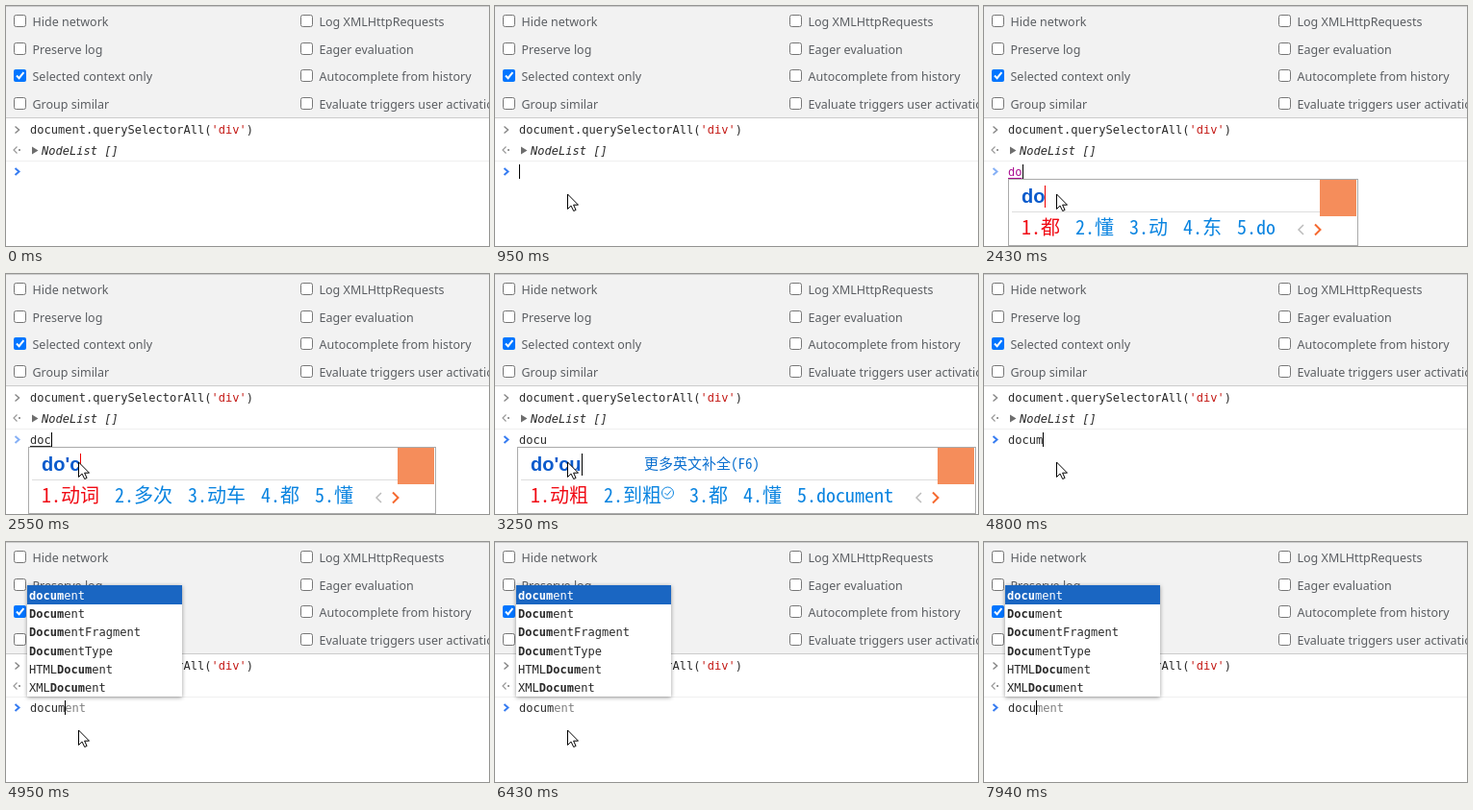
An HTML page for the animation above (8 s loop, 502x250 px).

```html
<!DOCTYPE html>
<html lang="en">
<head>
<meta charset="utf-8">
<title>Console autocomplete</title>
<style>
  html, body { margin: 0; width: 100%; height: 100%; overflow: hidden; background: #fff; }
  svg { display: block; }
  text { white-space: pre; }
  .label { font: 12.5px "Noto Sans", sans-serif; fill: #5b5e62; }
  .code { font: 12.05px "DejaVu Sans Mono", monospace; fill: #2a2a2a; }
  .spelling { font: bold 20px "Liberation Sans", sans-serif; fill: #0b5bcc; }
  .choice { font: 20px "Noto Sans Mono CJK SC", "Noto Sans CJK SC", monospace; fill: #0a84e0; }
  .hint { font: 15px "Noto Sans Mono CJK SC", "Noto Sans CJK SC", monospace; fill: #0a6fcf; }
  .popup { filter: drop-shadow(0 1px 2px #0006); }
</style>
</head>
<body>
<svg width="502" height="250" viewBox="0 0 502 250">
  <g id="base"></g>
  <g id="live"></g>
</svg>
<script>
const LOOP = 8000, CHAR = 7.25, INPUT_X = 25;

// Each list holds [start time, value]; a value lasts until the next entry.
const typed = [[0, ''], [2310, 'd'], [2430, 'do'], [2550, 'doc'], [2670, 'docu'], [4800, 'docum'], [7940, 'docu']];
const pointer = [[0, null], [560, [142, 238]], [680, [87, 203]], [830, [75, 195]], [6830, null]];
const caretFlips = [950, 1510, 2040, 3250, 3370, 3650, 4240, 5350, 5910, 6430, 6950, 7410, 7940];
const menus = {
  d: ['d', 25, '的 到 大 都 等'],
  do: ['do', 25, '都 懂 动 东 do'],
  doc: ["do'c", 23, '动词 多次 动车 都 懂'],
  docu: ["do'cu", 23, '动粗 到粗✓ 都 懂 document'],
};
const suggestions = ['document', 'Document', 'DocumentFragment', 'DocumentType', 'HTMLDocument', 'XMLDocument'];

const at = (list, t) => list.findLast(([start]) => t >= start)[1];
const rect = (x, y, w, h, fill, more = '') =>
  `<rect x="${x}" y="${y}" width="${w}" height="${h}" fill="${fill}" ${more}/>`;
const line = (d, stroke, width = 1) =>
  `<path d="${d}" fill="none" stroke="${stroke}" stroke-width="${width}"/>`;
const text = (x, y, cls, content, style = '') =>
  `<text x="${x}" y="${y}" class="${cls}" style="${style}">${content}</text>`;
const span = (content, style) => `<tspan style="${style}">${content}</tspan>`;
const chevron = (y, color, width) => line(`M9.5 ${y - 3.5}l4 3.5l-4 3.5`, color, width);

function option(x, y, label, checked) {
  const box = checked
    ? rect(x, y - 6, 13, 13, '#0075ff', 'rx="2"') + line(`M${x + 3} ${y + .5}l2.6 2.7l4.8 -6`, '#fff', 2)
    : rect(x + .5, y - 5.5, 12, 12, '#fff', 'rx="2" stroke="#767676"');
  return box + text(x + 19.5, y + 6, 'label', label);
}

function base() {
  const left = ['Hide network', 'Preserve log', 'Selected context only', 'Group similar'];
  const right = ['Log XMLHttpRequests', 'Eager evaluation', 'Autocomplete from history', 'Evaluate triggers user activation'];
  const rows = [15, 44, 72, 101];
  return rect(0, 0, 502, 116, '#f2f2f2') + rect(0, 0, 502, 1, '#ccc') + rect(0, 116, 502, 1, '#ccc')
    + rows.map((y, i) => option(8, y, left[i], i === 2) + option(306, y, right[i])).join('')
    + chevron(129, '#888', 1.5)
    + text(INPUT_X, 133, 'code', `document.querySelectorAll(${span("'div'", 'fill:#c41a16')})`)
    + line('M11.5 146.5l-3.5 3.5l3.5 3.5', '#999', 1.2) + rect(13, 149, 2, 2, '#999')
    + '<path d="M27 146.5v8l6.5 -4z" fill="#6e6e6e"/>'
    + text(37, 155, 'code', 'NodeList []', 'font-style:italic')
    + rect(0, 161, 502, 1, '#f0f0f0');
}

function inputMethod(value, showHint) {
  const [spelling, left, words] = menus[value];
  let x = left + 14, items = '';
  words.split(' ').forEach((word, i) => {
    const ticked = word.endsWith('✓');
    const name = word.replace('✓', '');
    items += text(x, 238, 'choice', `${i + 1}.${name}`, i ? '' : 'fill:#f00a14');
    x += 20 + name.length * (/[a-z]/.test(name) ? 10 : 20);
    if (ticked) {
      items += `<circle cx="${x + 6.5}" cy="228" r="6" fill="none" stroke="#0a84e0"/>`
        + line(`M${x + 3.5} 228l2.5 2.5l4 -5`, '#0a84e0');
      x += 13;
    }
    x += 16;
  });
  const right = x + 70;
  const caretX = left + 14 + [...spelling].reduce((w, c) => w + ({ "'": 4.8, c: 11.1 }[c] || 12.2), 0);
  return rect(left + .5, 180.5, right - left - 1, 69, '#fff', 'stroke="#aaa"')
    + rect(left + 4, 214, right - left - 44, 1, '#ddd')
    + rect(right - 40, 181, 38, 38, '#f58d5b')
    + text(left + 14, 205, 'spelling', spelling)
    + rect(Math.round(caretX), 187, 1, 23, showHint ? '#000' : '#e00')
    + (showHint ? text(155, 203, 'hint', '更多英文补全(F6)') : '')
    + items
    + line(`M${right - 57} 228l-5 5l5 5`, '#bbb', 1.5)
    + line(`M${right - 45} 227.5l5.5 5.5l-5.5 5.5`, '#f5692f', 2);
}

function completions(value) {
  const rows = suggestions.map((word, i) => {
    const start = word.toLowerCase().indexOf(value), end = start + value.length;
    const content = word.slice(0, start) + span(word.slice(start, end), 'font-weight:bold') + word.slice(end);
    return text(24, 59.5 + i * 19.35, 'code', content, i ? '' : 'fill:#fff');
  });
  return `<g class="popup">${rect(22, 45, 161, 116, '#fff')}</g>`
    + rect(22, 45, 161, 20, '#1a66c2') + rows.join('');
}

function scene(t) {
  const value = at(typed, t), arrow = at(pointer, t);
  const composing = t >= 2310 && t < 3370, suggesting = t >= 4950;
  const underlined = composing && t < 3250;
  const caretOn = caretFlips.filter(flip => t >= flip).length % 2 === 1;
  const color = value === 'do' ? '#aa0d91' : '#2a2a2a';
  const end = INPUT_X + value.length * CHAR;

  let out = chevron(172.5, t >= 2310 && t < 2670 ? '#86b0f6' : '#367cf1', 2)
    + text(INPUT_X, 177, 'code', span(value, `fill:${color}`)
      + (suggesting ? span('document'.slice(value.length), 'fill:#808080') : ''));
  if (underlined) out += rect(INPUT_X, 179, end - INPUT_X, 1, color);
  if (caretOn) out += rect(Math.round(end), 165, 1, 15, '#000');
  if (composing) out += inputMethod(value, t >= 3100);
  if (suggesting) out += completions(value);
  if (arrow) out += `<path transform="translate(${arrow})" fill="#fff" stroke="#000"
    d="M.5 1v15.5l3.6 -3.4l2.6 5.4l2.4 -1l-2.5 -5.3h4.9z"/>`;
  return out;
}

const live = document.getElementById('live');
let shown = '';
function tick() {
  const next = scene(performance.now() % LOOP);
  if (next !== shown) live.innerHTML = shown = next;
  requestAnimationFrame(tick);
}
document.getElementById('base').innerHTML = base();
tick();
</script>
</body>
</html>
```
